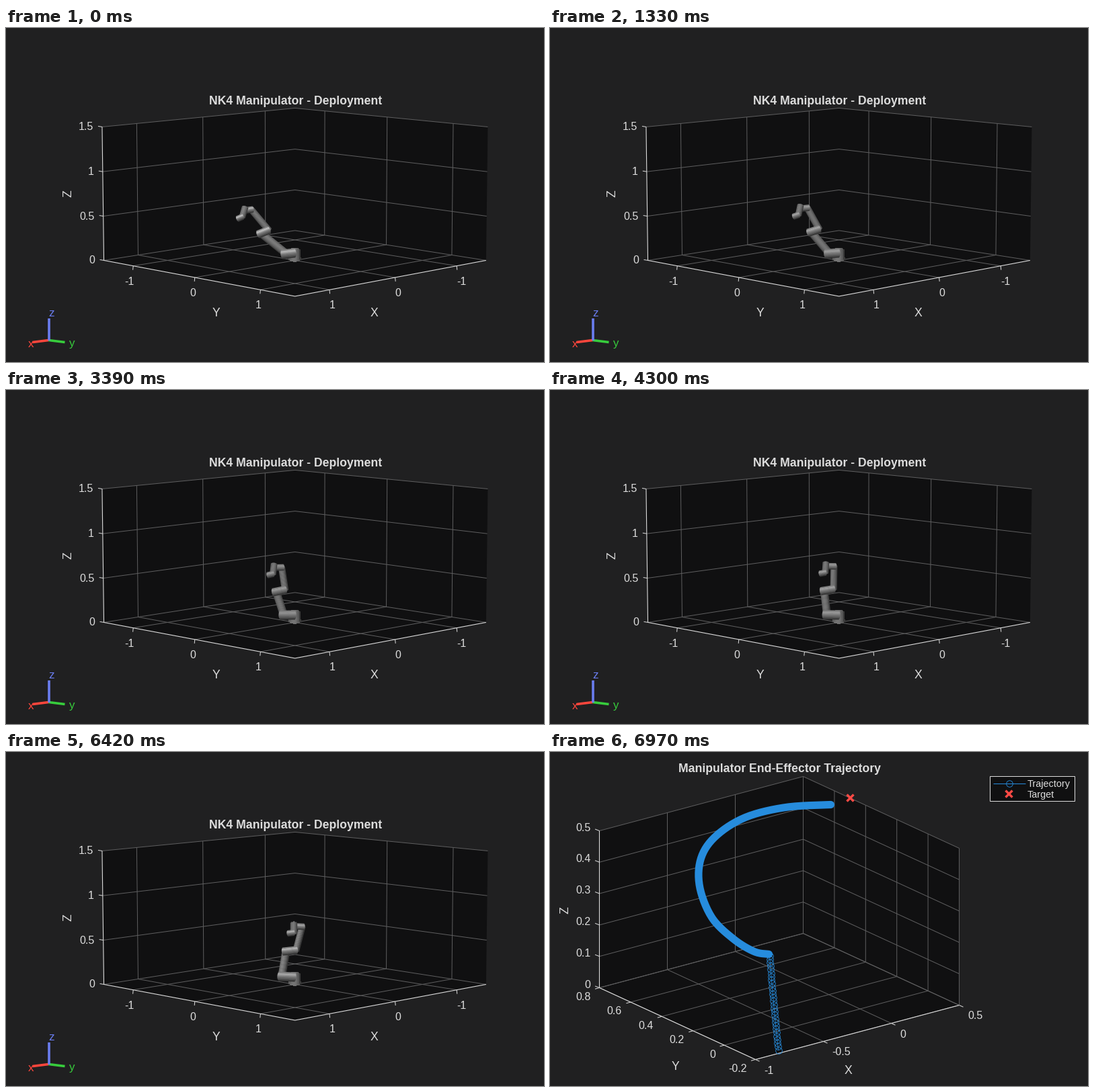
A matplotlib script that plays this animation: 800 px wide and 498 px high, repeating every 7 s.

```python
import numpy as np
import matplotlib.pyplot as plt
from matplotlib.animation import FuncAnimation
from matplotlib.collections import LineCollection

W, H, DPI = 800, 498, 64
FRAMES, INTERVAL = 200, 35
CUT_MS, STOP_MS = 6790, 5610
PT = 72 / DPI  # points per pixel

BACK, PANEL, GRID, INK = "#202021", "#101011", "#5e5e5f", "#dcdcdc"
BLUE, RED = "#268cdd", "#ff4a45"

plt.rcParams["font.family"] = "Liberation Sans"
fig = plt.figure(figsize=(W / DPI, H / DPI), dpi=DPI, facecolor=BACK)


def stage():
    """Axes whose whole coordinates are pixel centres."""
    ax = fig.add_axes([0, 0, 1, 1])
    ax.set(xlim=(-0.5, W - 0.5), ylim=(H - 0.5, -0.5))
    ax.axis("off")
    return ax


def line(ax, pts, color=GRID, width=1.0, **kw):
    kw.setdefault("solid_capstyle", "butt")
    ax.plot(*np.transpose(pts), color=color, lw=width * PT, **kw)


def text(ax, x, y, s, size=16, color=INK, ha="center", **kw):
    kw.setdefault("va", "baseline")
    ax.text(x, y, s, fontsize=size * PT, color=color, ha=ha, **kw)


def panel(ax, pts):
    ax.fill(*np.transpose(pts), color=PANEL, lw=0)


def tick(ax, p, mark, s, offset, ha):
    line(ax, [p, p + mark], INK)
    text(ax, *(p + offset), s, ha=ha)


def cross(ax, x, y):
    for s in (-1, 1):
        line(ax, [(x - 5, y - 5 * s), (x + 5, y + 5 * s)], RED, 3.4)


# ---- robot scene ----
room = stage()
E = 1.5  # half width and height of the box


def view(x, y, z):
    """Perspective camera looking along the box diagonal."""
    right, depth, up = (y - x) / 2**0.5, -(x + y) / 2**0.5, z - E / 2
    scale = 3095 / (23 + depth - 0.139 * up)
    return np.array([429.2 + scale * right, 246.9 - scale * (0.986 * up + 0.139 * depth)])


panel(room, [view(E, -E, 0), view(E, -E, E), view(-E, -E, E),
             view(-E, E, E), view(-E, E, 0), view(E, E, 0)])
for z in np.arange(0, 2, 0.5):
    line(room, [view(E, -E, z), view(-E, -E, z), view(-E, E, z)])
    tick(room, view(E, -E, z), (-6, -1), f"{z:g}", (-13, 5), "right")
for v in (-1, 0, 1):
    line(room, [view(v, E, 0), view(v, -E, 0), view(v, -E, E)])
    line(room, [view(E, v, 0), view(-E, v, 0), view(-E, v, E)])
    tick(room, view(v, E, 0), (0.6, 6), f"{v}", (0, 28), "left")
    tick(room, view(E, v, 0), (-0.6, 6), f"{v}", (1, 28), "right")
line(room, [view(E, -E, E), view(E, -E, 0), view(E, E, 0), view(-E, E, 0)], INK, 1.1)

text(room, 312, 429, "Y", 17.6)
text(room, 546.5, 429, "X", 17.6)
text(room, 93, 246, "Z", 17.6, rotation=90, va="center")
text(room, 430, 113, "NK4 Manipulator - Deployment", 17.6, weight="bold")

for tip, spot, s, color in [((39, 468), (37, 475), "x", "#ff463c"),
                            ((87, 468), (97, 475), "y", "#37cd3c"),
                            ((63, 432), (67, 430), "z", "#6a7df0")]:
    line(room, [(63, 465), tip], color, 3.6)
    text(room, *spot, s, 17, color)

# Shoulder, elbow (two ends), wrist, wrist top, wrist bottom, tool
FOLDED = np.array([(411, 337), (375, 307), (390, 301), (364, 270),
                   (355, 267), (351, 281), (344, 284)], float)
RAISED = np.array([(406, 334), (412, 297), (431, 295), (440, 260),
                   (427, 254), (427, 269), (419, 270)], float)
BASE = np.array([429, 336])
LIGHT = np.array([-0.25, -0.55, 0.8])
STRIPS = (np.arange(11) + 0.5) / 5.5 - 1


def cylinder(a, b, r, gloss):
    """Lengthwise strips shaded by their surface normal."""
    d = (b - a) / np.hypot(*(b - a))
    n = np.array([-d[1], d[0]])
    z = np.sqrt(1 - STRIPS**2)
    side = STRIPS[:, None] * r * n
    bulge = 0.45 * r * z[:, None] * d
    segs = np.stack([a + side - bulge, b + side + bulge], axis=1)
    lit = np.clip(STRIPS * (n @ LIGHT[:2]) + z * LIGHT[2], 0, 1)
    gray = np.clip((52 + 78 * lit + 75 * gloss * lit**12) / 255, 0, 1)
    return segs, np.repeat(gray[:, None], 3, axis=1), np.full(len(z), (2 * r / 11 + 0.5) * PT)


arm = LineCollection([], capstyle="butt", zorder=5)
room.add_collection(arm)


def draw_arm(ms):
    s = min(ms / STOP_MS, 1)
    shoulder, inner, outer, wrist, top, bottom, tool = FOLDED + s * (RAISED - FOLDED)
    gloss = 0.35 + 2 * (s - 0.5)**2
    links = [
        (BASE + (0, 7), BASE + (0, 8), 9.5, 0),
        (BASE + (0, -5), BASE + (0, 7), 8, 0),
        (outer, wrist, 4.8, gloss * 0.8),
        (shoulder + (4, -2), inner + (4, -1), 5.6, gloss),
        (outer, inner, 5.8, gloss),
        (BASE + (-1, -1), shoulder, 6.8, gloss),
        (wrist + (2, 0), 0.65 * top + 0.35 * bottom, 4.6, gloss),
        (top, bottom, 4.6, gloss * 0.5),
        (bottom, tool, 4.4, gloss),
    ]
    segs, colors, widths = map(np.concatenate, zip(*(cylinder(*k) for k in links)))
    arm.set_segments(segs)
    arm.set_color(colors)
    arm.set_linewidth(widths)


# ---- trajectory scene ----
plot = stage()


def at(x, y, z):
    """Flat projection of the unit box."""
    return np.array([305 + 303 * x - 232 * y, 458 - 81 * x - 107 * y - 234 * z])


panel(plot, [at(0, 0, 0), at(0, 1, 0), at(0, 1, 1), at(1, 1, 1), at(1, 0, 1), at(1, 0, 0)])
for k in range(4):
    x = k / 3
    line(plot, [at(x, 0, 0), at(x, 1, 0), at(x, 1, 1)])
    tick(plot, at(x, 0, 0), (6, 2.7), f"{k / 2 - 1:g}", (12.5, 21), "left")
for k in range(6):
    f = k / 5
    line(plot, [at(0, f, 0), at(1, f, 0), at(1, f, 1)])
    line(plot, [at(0, 1, f), at(1, 1, f), at(1, 0, f)])
    tick(plot, at(0, 1, f), (-6.5, -2.5), f"{k / 10:g}", (-13, 0), "right")
    tick(plot, at(0, f, 0), (-6.5, 1.8), f"{(k - 1) / 5:g}", (-13, 18.5), "right")
line(plot, [at(0, 1, 1), at(0, 1, 0), at(0, 0, 0), at(1, 0, 0)], INK, 1.1)

text(plot, 186, 474, "Y", 17.6)
text(plot, 442.5, 480, "X", 17.6)
text(plot, 22, 235, "Z", 17.6, rotation=90, va="center")
text(plot, 341, 29.5, "Manipulator End-Effector Trajectory", 17.6, weight="bold")

RING = dict(marker="o", markersize=9.6 * PT, markerfacecolor="none",
            markeredgecolor=BLUE, markeredgewidth=0.85 * PT)
CURVE = np.array([(325, 301), (303, 297), (272, 278), (240, 246), (222, 200),
                  (224, 158), (246, 125), (290, 97), (350, 82), (417, 78)], float)


def smooth(points, steps=16):
    """Catmull-Rom curve through the points."""
    p = np.vstack([points[0], points, points[-1]])
    u = np.linspace(0, 1, steps)[:, None]
    return np.vstack([
        0.5 * (2 * b + (c - a) * u + (2 * a - 5 * b + 4 * c - d) * u**2
               + (3 * b - a - 3 * c + d) * u**3)
        for a, b, c, d in zip(p, p[1:], p[2:], p[3:])])


u = np.linspace(0, 1, 28)
line(plot, np.column_stack([339 - 13 * u - 2 * u * (1 - u), 444 - 141 * u]), BLUE, 0.8, **RING)
line(plot, smooth(CURVE), BLUE, 11.2, solid_capstyle="round", solid_joinstyle="round")
cross(plot, 446, 68)

plot.add_patch(plt.Rectangle((653.5, 35), 126, 37.5, facecolor=PANEL, edgecolor=INK,
                             lw=PT, zorder=1.5))
line(plot, [(658.5, 46), (706.5, 46)], BLUE)
line(plot, [(682, 46)], BLUE, **RING)
cross(plot, 682, 62)
text(plot, 709.5, 51.5, "Trajectory", 14.4, ha="left")
text(plot, 709.5, 67.5, "Target", 14.4, ha="left")


def update(frame):
    ms = frame * INTERVAL
    room.set_visible(ms < CUT_MS)
    plot.set_visible(ms >= CUT_MS)
    draw_arm(ms)
    return []


anim = FuncAnimation(fig, update, frames=FRAMES, interval=INTERVAL, repeat=True,
                     repeat_delay=0, blit=False)
plt.show()
```
